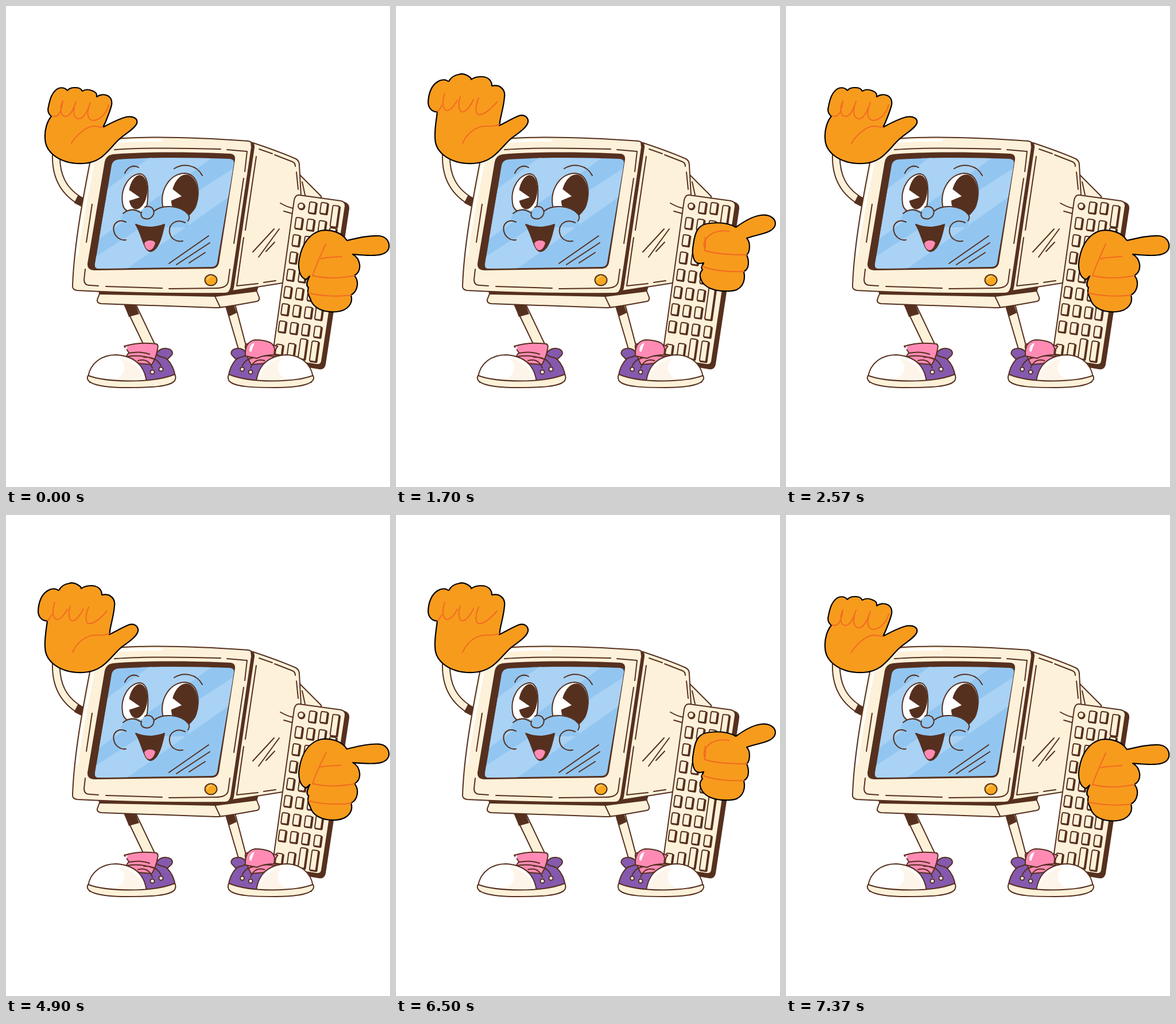
Animation of 669 by 837 pixels, one loop 9.61 s. Source, as an HTML page:

```html
<!DOCTYPE html>
<html lang="en">
<head>
<meta charset="utf-8">
<title>Waving computer</title>
<style>
html,body{margin:0;width:100%;height:100%;overflow:hidden;background:#fff}
svg{display:block;width:100vw;height:100vh}
.o{stroke:#56301f;stroke-width:2}
.l{fill:none;stroke:#56301f;stroke-width:2}
.c{fill:#fef1d9}
.d{fill:#56301f}
.w{fill:#fff}
.p{fill:#ff8bb5}
.v{fill:#8559ae}
.b{fill:#92c6f1}
.hand{fill:#f79b1d;stroke:#000;stroke-width:2.2}
.crease{fill:none;stroke:#f26b21;stroke-width:2}
</style>
</head>
<body>
<svg viewBox="0 0 669 837" stroke-linecap="round" stroke-linejoin="round">
<defs>
<clipPath id="screen"><path d="M196,267C260,263 330,264 390,266Q398,267 397,274L368,446Q367,453 359,454L162,457Q154,457 155,449L184,277Q186,268 196,267Z"/></clipPath>
<g id="shoe">
  <path class="v o" d="M262,606C264,599 272,595 280,596C290,597 293,605 286,610L281,615C288,622 293,632 295,645L240,655L228,619L240,606Z"/>
  <path class="l" d="M263,607C268,612 276,610 281,615"/>
  <path class="p o" d="M206,592Q232,584 262,588Q266,590 264,597Q262,611 254,624L232,622C222,617 213,612 210,609L214,603Z"/>
  <path class="l" d="M214,604Q235,600 250,606M212,610Q236,606 262,616M230,617Q248,612 255,630M240,611Q262,610 270,626" stroke-width="1.6"/>
  <path class="w o" d="M143,645C147,621 167,607 192,607C212,608 227,616 235,627C242,637 244,646 245,655L146,655Z"/>
  <path d="M196,612C224,617 238,636 240,651L172,654C206,650 216,628 196,612Z" fill="#fef5ea"/>
  <path class="c o" d="M143,643C175,655 255,657 294,641Q297,646 294,652C285,663 250,664 210,664C165,664 135,657 143,643Z"/>
  <circle class="w o" cx="255" cy="637" r="3.5"/><circle class="w o" cx="270" cy="632" r="3.5"/>
</g>
</defs>
<rect width="669" height="837" fill="#fff"/>

<!-- left arm and legs -->
<g fill="none" stroke-linecap="butt">
  <path d="M88,250C84,295 100,324 134,342" stroke="#56301f" stroke-width="15"/>
  <path d="M88,250C84,295 100,324 134,342" stroke="#fef1d9" stroke-width="11"/>
  <path d="M122,336L134,342" stroke="#56301f" stroke-width="15"/>
</g>
<path class="c o" d="M206,519L226,519L259,588L240,590Z"/>
<path class="d" d="M205,518L225,518L232,536L214,541Z"/>
<path class="c o" d="M382,519L399,519L421,602L407,604Z"/>
<path class="d" d="M382,519L397,519L402,534L389,540Z"/>

<!-- monitor -->
<path class="c o" d="M512,294L549,331L549,350L500,345Z"/>
<path class="c o" d="M164,498L159,511Q158,517 166,518L365,525Q372,526 437,514Q442,513 441,507L436,494Z"/>
<path class="l" d="M364,505L373,524"/>
<path class="d" d="M160,495L390,497L440,488L437,497L365,506L163,502Z"/>
<path class="c o" d="M430,238C460,248 487,258 505,266Q511,269 511,277L514,330L488,481L393,496Z"/>
<path class="l" d="M441,249L464,257M468,259L499,271Q504,273 504,279M506,289L509,319M436,262L417,390M414,403L402,487L439,483M449,481L470,478M467,388L430,428M476,388L440,437M468,411L453,427M478,343Q490,350 500,352M484,357L498,361M516,306L521,329"/>
<path class="c o" d="M158,243Q170,232 205,230C260,227 340,229 422,235Q430,236 429,243L393,491Q391,500 380,500C290,501 200,499 124,495Q115,494 116,486C119,410 135,330 147,268Z"/>
<path class="d" d="M426,236Q434,238 433,246L397,490Q395,501 382,501Q389,498 391,489L427,246Z"/>
<path d="M153,268C141,330 128,390 124,434M197,236Q235,233 271,234" fill="none" stroke="#fff" stroke-width="4"/>
<path class="l" d="M189,250C250,246 310,247 374,249M385,250L420,253L416,288M414,300L397,413M150,345L140,411M138,458L136,476Q136,486 146,486L161,487M174,488L272,491M284,492L365,491Q385,491 387,480L390,458"/>
<path class="d" d="M186,258C250,253 330,254 391,257Q400,258 399,267L371,447Q369,456 360,457L153,460Q141,459 142,448L172,271Q174,260 186,258Z"/>
<g clip-path="url(#screen)">
  <path class="b" d="M140,250H405V465H140Z"/>
  <path d="M160,407L174,320L252,262L362,262ZM155,460L150,440L400,280L398,325L207,460Z" fill="#a9d2f5"/>
</g>
<ellipse cx="357" cy="477" rx="10.5" ry="9.5" fill="#f9a91f" class="o"/>
<path d="M351,476Q353,470 358,470" fill="none" stroke="#ffd478" stroke-width="2"/>

<!-- face -->
<path class="w o" d="M204,348C197,318 215,292 234,292C248,294 249,318 246,345C241,363 212,367 204,348Z"/>
<ellipse class="d" cx="230" cy="324" rx="16" ry="30" transform="rotate(8 230 324)"/>
<path class="w" d="M207,315L233,333L208,341Z"/>
<path class="w o" d="M274,353C266,320 286,292 311,291C335,292 339,322 331,347C322,372 282,374 274,353Z"/>
<ellipse class="d" cx="311" cy="331" rx="23" ry="38" transform="rotate(7 311 331)"/>
<path class="w" d="M283,313L306,331L280,342Z"/>
<path class="b" d="M200,370C208,351 225,351 236,357Q241,347 250,348Q258,350 260,356C274,343 306,346 320,365L317,385H205Z"/>
<path class="l" d="M204,361C215,352 225,353 235,360M236,359C233,368 241,372 249,370C257,367 261,358 254,351Q248,347 242,350M258,357C272,345 304,346 318,363Q321,369 317,374M209,376C195,369 185,380 188,392C190,402 200,409 209,407M312,377C296,369 283,380 285,394C287,406 298,411 308,409M207,291C212,279 223,276 231,281M293,283C309,273 332,276 342,295"/>
<path class="d o" d="M226,380Q250,390 276,380C272,399 266,425 252,427C240,427 238,399 226,380Z"/>
<path class="p" d="M241,413C244,407 256,406 260,412C256,429 244,429 241,413Z"/>
<path class="l" d="M353,400L284,448M355,412L297,450M347,429L319,447"/>

<!-- keyboard -->
<path class="d o" d="M514,331L590,342Q598,345 597,353L556,623Q554,633 545,631L475,619Z"/>
<path class="c o" d="M511,329L583,339Q592,341 591,349L550,618Q549,625 541,624L471,613Q463,611 465,603L502,338Q504,328 511,329Z"/>
<g id="keys"><circle class="d" cx="515" cy="349" r="6.5"/><circle class="c o" cx="514" cy="348" r="5" stroke-width="1.6"/></g>

<use href="#shoe"/>
<use href="#shoe" transform="matrix(-.97 0 0 1 673.5 0)"/>
<path d="M207,600L210,594M427,600Q425,592 431,588" fill="none" stroke="#fff" stroke-width="3"/>
<path class="p o" d="M417,609C416,594 421,583 434,581Q450,581 461,586Q467,590 468,598L467,607Q450,607 437,613Z"/>
<path class="w" d="M424,600Q424,589 433,586L427,602Z"/>

<g id="left"><path class="hand"/><path class="crease"/><path class="crease"/></g>
<g id="right"><path class="hand"/><path class="crease"/></g>
</svg>
<script>
const $ = s => document.querySelector(s);

// keys: centre x, centre y, height
const keys = [[534,351,19],[554,352,19],[573,366,37],[569,396,19]];
for (let r = 1; r < 8; r++)
  for (let c = 0; c < 3; c++) keys.push([515 - r * 4.8 + c * 20.3, 348 + r * 30 + c * 2.7, 19]);
keys.push([548,515,62], [543,567,19], [476,598,18], [497,599,23], [517,597,35], [537,601,35]);
$('#keys').insertAdjacentHTML('beforeend', keys.map(([x, y, h]) =>
  `<g transform="translate(${x} ${y}) rotate(8)"><rect class="d" x="-6" y="${-h / 2}" width="14" height="${h + 2}" rx="2"/>` +
  `<rect class="c o" x="-6" y="${-h / 2}" width="11" height="${h}" rx="2" stroke-width="1.7"/></g>`).join(''));

// open, curled, fist
const palm = [
 'M70,195C74,160 84,130 92,105C96,92 104,88 109,91C115,95 115,103 112,115C108,130 105,142 104,155C110,130 120,105 130,80C135,65 143,60 149,63C155,67 155,77 151,88C146,108 138,130 136,149C146,122 160,92 173,65C178,52 186,47 190,51C196,57 192,70 190,80C182,105 170,130 167,157C175,135 186,110 194,90C198,80 207,77 212,83C217,90 214,103 209,118C201,145 192,172 182,201C195,194 207,187 216,184C227,181 234,187 232,195C228,209 208,225 197,234C180,250 168,272 135,274C95,276 68,255 68,230C67,218 68,205 70,195Z',
 'M72,184C64,185 56,178 56,167C57,150 63,138 72,132C78,128 86,127 91,131C91,131 92,131 92,131C96,124 103,120 110,119C115,117 122,119 126,122C129,124 131,126 131,127C131,127 131,128 131,128C136,124 143,123 149,123C156,123 162,126 165,131C167,134 167,137 167,138C167,138 167,139 167,139C172,138 178,138 182,141C188,145 190,151 189,158C188,172 184,186 182,196C181,200 181,204 180,208C192,202 206,194 214,191C224,188 231,194 230,202C228,212 212,222 200,231C182,247 170,272 135,274C95,276 68,255 68,230C67,215 70,200 72,184Z',
 'M79,192C74,188 72,182 74,175C77,160 80,152 87,146C93,141 101,141 106,146C106,146 107,147 107,147C110,143 115,142 120,142C126,142 131,144 132,147C132,147 133,148 133,148C133,148 133,148 133,148C138,145 144,145 149,147C155,149 158,152 158,155C158,156 158,157 158,157C158,157 158,158 158,158C163,154 171,153 177,156C183,159 185,165 184,172C182,181 178,190 175,198C173,203 171,207 169,211C182,204 197,196 210,193C222,191 230,196 228,204C224,214 208,222 196,233C178,250 168,272 135,274C95,276 68,255 68,230C67,215 72,200 79,192Z'];
const palmLine = [
 'M118,237C125,218 148,203 163,204C170,205 176,205 182,202',
 'M116,239C123,222 140,208 158,209C168,209 174,209 180,206',
 'M114,239C120,228 138,210 152,209C158,209 163,211 169,211'];
const folds = [
 'M72,184Q76,181 80,173M85,152C80,165 81,181 89,182C96,181 101,174 107,164M112,158C107,174 110,186 118,184C125,181 130,173 135,163M144,160C137,177 138,190 146,189C157,188 169,175 176,167',
 'M80,191C92,196 97,182 99,165C92,182 96,193 105,192C113,191 118,178 122,166C115,184 118,195 126,196C134,198 142,183 147,168C140,185 141,196 150,199C162,200 174,189 179,172'];
// pointing right, halfway, pointing up
const point = [
 'M523,476C511,473 508,455 511,440C516,412 530,396 548,391C566,388 585,394 594,408C612,404 632,399 650,400C662,401 669,410 667,421C664,433 648,434 636,434C624,434 614,433 604,432C617,439 622,460 607,469C615,478 614,496 601,503C605,516 597,530 576,532C552,534 534,525 530,509C525,500 525,495 527,490C522,487 524,480 529,470Z',
 'M530,448C517,449 515,430 518,415C521,390 528,379 548,378C565,376 580,378 592,385C605,376 620,366 636,364C650,362 661,369 661,379C660,390 647,394 636,397C628,399 620,401 611,404C618,411 617,428 611,433C616,445 615,458 606,462C610,480 602,497 579,496C555,497 536,490 531,475C528,468 530,463 534,459C530,455 534,452 536,447Z',
 'M527,430C524,415 524,400 527,389C532,377 540,370 549,367C562,364 575,365 584,369C586,350 586,330 588,316C590,304 598,299 606,299C613,299 615,304 614,311C612,335 609,357 606,380C605,400 603,415 601,430C599,445 598,455 597,468C595,484 592,494 580,492C566,490 555,476 547,468C537,457 532,447 529,439C528,436 527,433 527,430Z'];
const pointLine = [
 'M534,470C538,455 548,435 557,414M548,440C560,437 572,437 585,436M534,469C555,475 585,474 607,469M527,499C545,505 580,506 601,503',
 'M537,420C534,405 550,388 580,392M538,403C540,410 540,418 537,425M537,425C555,432 590,433 611,433M534,453C555,462 590,463 606,462',
 'M547,373C560,370 580,371 598,380M540,385C555,375 580,382 601,381M532,410C540,420 550,414 558,412M544,404C590,398 564,415 571,458'];

const num = /\d+/g;
function pose(set, v) {
  const i = Math.max(0, Math.min(1, Math.floor(v))), to = set[i + 1].match(num);
  let k = 0;
  return set[i].replace(num, n => (+n + (to[k++] - n) * (v - i)).toFixed(1));
}

// start, step length, values
const curl = [[0, 100, [2]],
  [100, 81.4, [1, .85, .6, .4, .2, .05, -.05, 0]],
  [1370, 80, [.15, .4, .65, .85, 1, 1, .8, .5, .2, .02, .25, .55, .78]],
  [2400, 85, [.9, 1, 2]]];
const lift = [[0, 100, [0]],
  [100, 81.4, [.04, .3, .7, 1, 1.4, 1.75, 1.95, 2]],
  [1370, 80, [1.9, 1.7, 1.45, 1.2, 1, .8, .6, .45, .3, .2, .1, .04, 0]]];
function at(track, t) {
  const [start, step, vals] = track.filter(s => t >= s[0]).pop();
  return vals[Math.min(vals.length - 1, Math.floor((t - start) / step))];
}

const left = $('#left').children, right = $('#right').children;
function draw(now) {
  const t = now % 9610 % 4800, c = at(curl, t), v = at(lift, t);
  left[0].setAttribute('d', pose(palm, c));
  left[1].setAttribute('d', pose(palmLine, c));
  left[2].setAttribute('d', folds[c > 1.5 ? 1 : 0]);
  left[2].style.opacity = c > .7 ? 1 : 0;
  right[0].setAttribute('d', pose(point, v));
  right[1].setAttribute('d', pose(pointLine, v));
}
const t0 = performance.now();
function tick() {
  draw(performance.now() - t0);
  requestAnimationFrame(tick);
}
tick();
</script>
</body>
</html>
```
